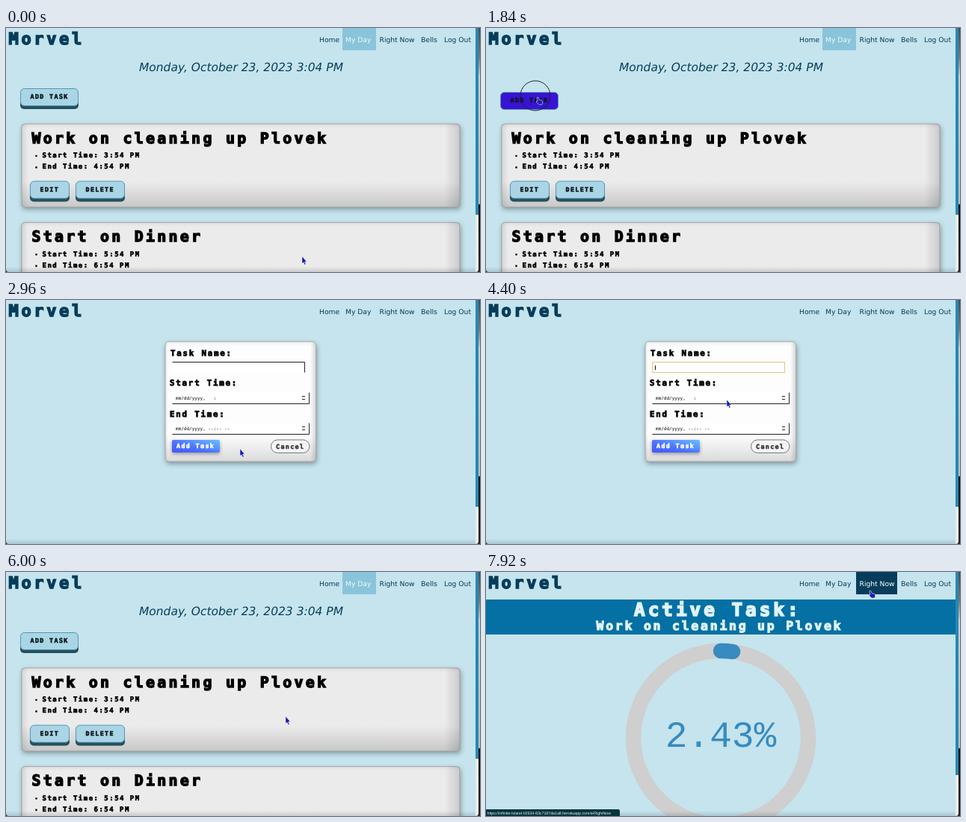
Animation, 634 px wide and 328 px high, one loop 8 s. Source, as an HTML page:

```html
<!DOCTYPE html>
<html lang="en">
<head>
<meta charset="utf-8">
<title>Day planner</title>
<style>
  html, body { margin: 0; width: 100%; height: 100%; overflow: hidden; background: #c5e4ed; }
  svg { display: block; width: 634px; height: 328px; }
  text { text-rendering: geometricPrecision; white-space: pre; }
  .pixel { font-family: "DejaVu Sans Mono", monospace; font-weight: 700; letter-spacing: .165em; stroke-width: .07em; }
  .wide { font-family: "DejaVu Sans", sans-serif; }
  .mono { font-family: "Liberation Mono", monospace; }
  .small { font-family: "DejaVu Sans Mono", monospace; }
  .card { stroke: #aaa9ab; filter: drop-shadow(1px 3px 3px #0005); }
  .soft { filter: drop-shadow(0 2px 2px #0005); }
</style>
</head>
<body>
<svg id="stage" viewBox="0 0 634 328">
  <defs>
    <linearGradient id="fade" x2="0" y2="1">
      <stop offset="0" stop-color="#dedede"/><stop offset=".05" stop-color="#ebebeb"/>
      <stop offset=".7" stop-color="#ebebeb"/><stop offset="1" stop-color="#c8c8c8"/>
    </linearGradient>
    <linearGradient id="sides">
      <stop offset="0" stop-opacity=".09"/><stop offset=".015" stop-opacity="0"/>
      <stop offset=".965" stop-opacity="0"/><stop offset="1" stop-opacity=".14"/>
    </linearGradient>
    <linearGradient id="panel" x2="0" y2="1">
      <stop offset="0" stop-color="#f0f0f0"/><stop offset=".04" stop-color="#fdfdfd"/>
      <stop offset=".78" stop-color="#fdfdfd"/><stop offset="1" stop-color="#dadada"/>
    </linearGradient>
    <linearGradient id="blue" y1="1" y2="0">
      <stop offset="0" stop-color="#4455fa"/><stop offset=".4" stop-color="#4b70ff"/>
      <stop offset="1" stop-color="#6cc0ff"/>
    </linearGradient>
    <linearGradient id="floor" x2="0" y2="1">
      <stop offset="0" stop-opacity="0"/><stop offset="1" stop-opacity=".14"/>
    </linearGradient>
    <linearGradient id="edge" x2="0" y2="1">
      <stop offset="0" stop-color="#4a4a48"/><stop offset=".12" stop-color="#77787a"/>
      <stop offset=".2" stop-color="#c9d0d2"/><stop offset=".72" stop-color="#b9bfc2"/>
      <stop offset=".725" stop-color="#111"/><stop offset="1" stop-color="#2a2523"/>
    </linearGradient>
  </defs>
</svg>
<script>
const LOOP = 8000, NAVY = '#063d5b';
const stage = document.getElementById('stage');
const $ = id => document.getElementById(id);

const text = (cls, x, y, size, str, fill = '#000', more = '') =>
  `<text class="${cls}" x="${x}" y="${y}" font-size="${size}" fill="${fill}" ${more}>${str}</text>`;
const pixel = (x, y, size, str, fill = '#000') => text('pixel', x, y, size, str, fill, `stroke="${fill}"`);
const rect = (x, y, w, h, fill, more = '') =>
  `<rect x="${x}" y="${y}" width="${w}" height="${h}" fill="${fill}" ${more}/>`;

const button = (x, y, w, label, id) => `<g id="${id}">
  ${rect(x, y + 5, w, 23, '#25505e', `id="${id}Base" rx="5"`)}
  <g id="${id}Top">${rect(x + .5, y + .5, w - 1, 23, '#a9d5e5', `id="${id}Face" rx="5" stroke="#5497b1"`)}
  ${pixel(x + 13.5, y + 14.3, 8.35, label, '#10191d')}</g></g>`;

const task = (y, title, start, end) => `
  ${rect(21, y, 586, 111.5, 'url(#fade)', 'class="card" rx="4"')}
  ${rect(21, y, 586, 111.5, 'url(#sides)', 'rx="4"')}
  ${pixel(34.5, y + 25.5, 19.9, title)}
  ${['Start Time: ' + start, 'End Time: ' + end].map((line, i) =>
    `<circle cx="40.5" cy="${y + 43 + i * 15.4}" r="1.3"/>` +
    pixel(48.5, y + 45 + i * 15.4, 9, line)).join('')}`;

const dateField = (y, hint) => rect(222, y, 184, 16, '#fff') +
  `<path d="M222.5 ${y + 15.5}h183v-15" fill="none" stroke="#222"/>` +
  text('small', 227, y + 10, 6.03, hint) +
  `<path d="M396 ${y + 5.5}h4m-4 4h4" stroke="#222" stroke-width="1.2"/>`;

const links = [['Home', 419], ['My Day', 454], ['Right Now', 499.5], ['Bells', 555], ['Log Out', 586]];
const job = 'Work on cleaning up Plovek';

stage.insertAdjacentHTML('beforeend', `
  ${rect(0, 0, 634, 328, '#c5e4ed')}
  ${rect(450, 0, 45, 30, '#8ac4da', 'id="dayTab"')}
  ${rect(495, 0, 55, 30, NAVY, 'id="nowTab"')}
  ${pixel(3.5, 22, 22, 'Morvel', NAVY)}
  ${links.map(([name, x], i) => text('wide', x, 19, 9.2, name, NAVY, `id="link${i}"`)).join('')}

  <g id="day">
    ${text('wide', 314.5, 57.5, 15.5, 'Monday, October 23, 2023 3:04 PM', NAVY, 'text-anchor="middle" font-style="italic"')}
    ${button(19, 81, 78, 'ADD TASK', 'add')}
    ${task(129, job, '3:54 PM', '4:54 PM')}
    ${button(32, 205.5, 53, 'EDIT', 'edit')}
    ${button(93, 205.5, 66, 'DELETE', 'del')}
    ${task(261.5, 'Start on Dinner', '5:54 PM', '6:54 PM')}
  </g>

  <g id="form">
    ${rect(213, 56, 201.5, 161, 'url(#panel)', 'class="card" rx="5"')}
    ${rect(213.5, 56.5, 200.5, 160, 'url(#sides)', 'rx="5"')}
    ${pixel(220, 75, 10.8, 'Task Name:')}
    ${rect(222, 83, 178, 15, '#fff')}
    <path id="plain" d="M222.5 83.5h177v14" fill="none" stroke="#222"/>
    ${rect(222.5, 83.5, 177, 14, 'none', 'id="focused" stroke="#e2c67c"')}
    ${rect(226, 88, 1, 6, '#111', 'id="caret"')}
    ${pixel(219, 115, 10.8, 'Start Time:')}
    ${dateField(124, 'mm/dd/yyyy,   :')}
    ${pixel(219, 156.5, 10.8, 'End Time:')}
    ${dateField(165, 'mm/dd/yyyy, --:-- --')}
    ${rect(222, 188, 64, 17, 'url(#blue)', 'class="soft" rx="2"')}
    ${pixel(228, 199.3, 8.35, 'Add Task', '#fff')}
    ${rect(354.5, 188, 51.5, 17.5, '#f5f5f5', 'rx="8.7" stroke="#777"')}
    ${pixel(361, 199.5, 8.35, 'Cancel', '#3d3d3d')}
  </g>

  <g id="now">
    ${rect(0, 37, 628, 47, '#0470a4')}
    ${pixel(198, 58.5, 24.3, 'Active Task:', '#e0f4fa')}
    ${pixel(147.5, 77.5, 16.55, job, '#e0f4fa')}
    <g fill="none" stroke-width="20.5">
      <circle cx="314" cy="223" r="117" stroke="#cfcfcf"/>
      <circle cx="314" cy="223" r="117" stroke="#368bc1" pathLength="100" stroke-dasharray="2.2 97.8"
        stroke-linecap="round" transform="rotate(-90 314 223)"/>
    </g>
    ${text('mono', 314, 235, 49.5, '2.43%', '#368bc1', 'text-anchor="middle"')}
  </g>

  ${rect(0, 321, 628, 7, 'url(#floor)')}
  ${rect(628, 0, 4, 328, '#e9eeee')}
  ${rect(628, 0, 4, 251, '#2389b5', 'id="thumb"')}
  ${rect(632, 0, 2, 328, 'url(#edge)')}
  <path d="M0 324q0 4 4 4H0zM632 324q0 4-4 4h4z" fill="#3a3532"/>
  <g id="status">
    <path d="M0 319h177q2 0 2 2v7H0z" fill="#06343d"/>
    ${text('', 1.5, 325.6, 5.25, 'https://infinite-island-02934-83c7187da1a8.herokuapp.com/a/RightNow', '#f2f7f8', 'font-family="Liberation Sans, sans-serif"')}
  </g>
  <g id="pointer">
    <circle id="ring" cx="-3" cy="-2" r="20" fill="none" stroke="#18272e" stroke-width="1"/>
    <path id="arrow" d="M0 0v9.6l2-1.7 1.6 3.4 1.5-.7-1.6-3.3h2.7z" fill="#1414b4" stroke="#e4eefa" stroke-width=".5"/>
    <path id="hand" d="M-1 .5q1-1 2 0l1 3 4 1 .8 2.5-1 3h-4L-2 6l1-1 1 .6z" fill="#1a1ab8" stroke="#e4eefa" stroke-width=".6"/>
  </g>`);

// time, x, y of the pointer tip
const path = [
  [0, 396, 307], [400, 396, 307], [1440, 69, 93], [2080, 69, 93],
  [2880, 313, 200], [3040, 313, 200], [3300, 304, 91], [3980, 304, 91],
  [4400, 322, 134], [4800, 322, 134], [5440, 374, 194], [6440, 374, 194],
  [7120, 514, 25], [LOOP, 514, 25]
];
const clicks = [[1760, 1940], [3280, 3460], [5500, 5680], [7540, 7720]];
const FORM = 2000, FOCUS = 3360, BACK = 5680, NOW = 7760;

const within = (t, a, b) => t >= a && t < b;
const show = (id, on) => { $(id).style.display = on ? '' : 'none'; };
const paint = (id, fill) => $(id).setAttribute('fill', fill);

function tipAt(t) {
  const i = path.findIndex(p => p[0] > t);
  const [t0, x0, y0] = path[i - 1], [t1, x1, y1] = path[i];
  const k = (t - t0) / (t1 - t0), e = k * k * (3 - 2 * k);
  return [x0 + (x1 - x0) * e, y0 + (y1 - y0) * e];
}

function draw(t) {
  const [x, y] = tipAt(t);
  const page = within(t, FORM, BACK) ? 'form' : t >= NOW ? 'now' : 'day';
  for (const id of ['day', 'form', 'now']) show(id, id === page);
  $('thumb').setAttribute('height', { day: 251, form: 278, now: 273 }[page]);

  const overAdd = page === 'day' && within(x, 19, 97) && within(y, 81, 109);
  const overNow = within(x, 495, 550) && y < 30;
  const click = clicks.some(([a, b]) => within(t, a, b));
  const pressed = overAdd && click;

  show('dayTab', page === 'day');
  show('nowTab', overNow);
  show('status', overNow);
  paint('link1', page === 'day' ? '#eefaff' : NAVY);
  paint('link2', overNow ? '#fff' : NAVY);

  paint('addFace', overAdd ? '#3912d6' : '#a9d5e5');
  $('addTop').setAttribute('transform', `translate(0 ${pressed ? 5 : 0})`);
  show('addBase', !pressed);

  const focus = t >= FOCUS;
  show('plain', !focus);
  show('focused', focus);
  show('caret', focus && (t - FOCUS) % 1000 < 500);

  $('pointer').setAttribute('transform', `translate(${x} ${y})`);
  show('ring', click);
  show('hand', overAdd || overNow);
  show('arrow', !overAdd && !overNow);
}

const begin = performance.now();
function tick() {
  draw((performance.now() - begin) % LOOP);
  requestAnimationFrame(tick);
}
tick();
</script>
</body>
</html>
```
